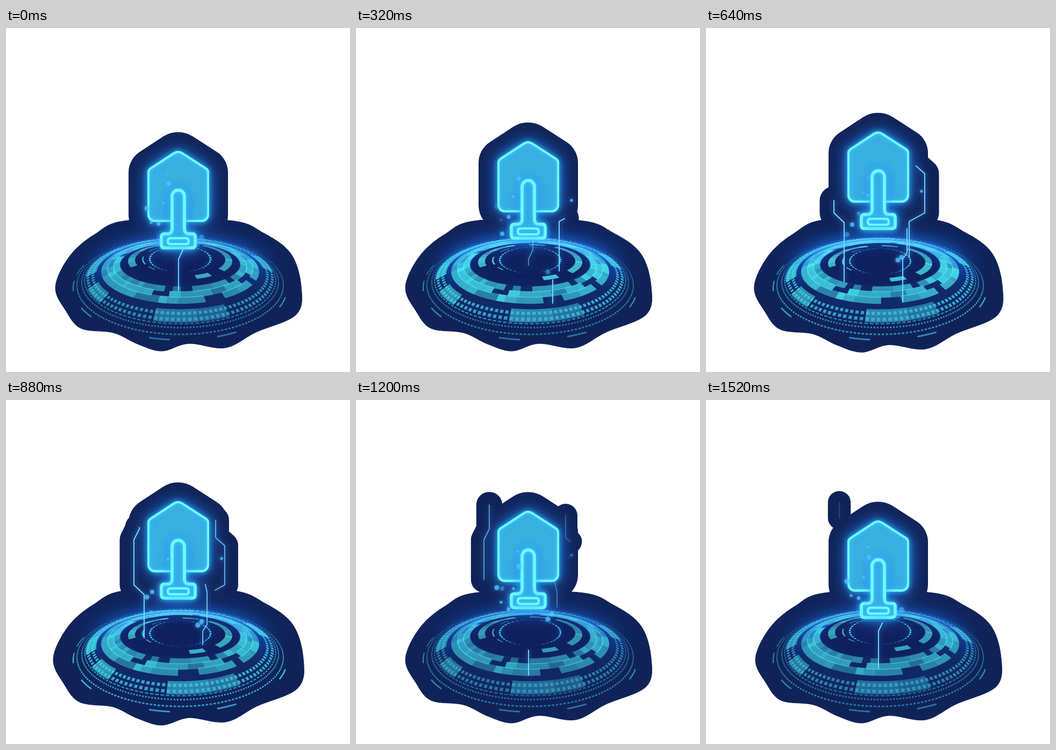
An HTML page with a canvas for the animation above (1.6 s loop, 640 px wide and 640 px high).

```html
<!DOCTYPE html>
<html>
<head>
<meta charset="utf-8">
<style>
  html, body { margin: 0; overflow: hidden; background: #fff; }
  canvas { display: block; }
</style>
</head>
<body>
<canvas id="stage" width="640" height="640"></canvas>
<script>
const ctx = document.getElementById('stage').getContext('2d');
const NAVY = '#102359', LOOP = 1600, STEP = 80, TAU = Math.PI * 2;
const clamp = v => Math.max(0, Math.min(1, v));
const rnd = i => { const v = Math.sin(i * 12.9898) * 43758.5453; return v - Math.floor(v); };
const since = (t, born) => (t - born + LOOP) % LOOP;

// Closed Catmull-Rom curve through a few points
function smoothShape(pts) {
  const path = new Path2D(), n = pts.length, at = i => pts[(i + n) % n];
  path.moveTo(...pts[0]);
  for (let i = 0; i < n; i++) {
    const [a, b, c, d] = [at(i - 1), at(i), at(i + 1), at(i + 2)];
    path.bezierCurveTo(b[0] + (c[0] - a[0]) / 6, b[1] + (c[1] - a[1]) / 6,
      c[0] - (d[0] - b[0]) / 6, c[1] - (d[1] - b[1]) / 6, ...c);
  }
  return path;
}
const floorShape = smoothShape([
  [228, 358], [165, 384], [118, 425], [92, 482], [112, 527], [140, 559], [200, 567], [245, 588],
  [290, 601], [340, 587], [408, 595], [465, 566], [540, 533], [549, 480], [530, 420], [480, 382], [414, 358]]);

// Shovel icon at its lowest position
const blade = new Path2D();
blade.moveTo(309, 359);
[[265, 359, 265, 264, 12], [265, 264, 320, 228, 9], [320, 228, 376, 264, 14],
 [376, 264, 376, 359, 9], [376, 359, 332, 359, 12]].forEach(a => blade.arcTo(...a));
blade.lineTo(331, 359);
const handle = new Path2D(`M309 313 A11.5 11.5 0 0 1 332 313 V373 Q332 383 340 383 H347
  Q352 383 352 389 V403 Q352 409 346 409 H295 Q289 409 289 403 V389 Q289 383 295 383 H301
  Q309 383 309 373 Z`);
const slot = new Path2D('M306 391 H335 Q340 391 340 396.5 Q340 402 335 402 H306 Q301 402 301 396.5 Q301 391 306 391 Z');

// Light traces: outline, length, time of birth
const traces = [
  ['M378 452V360L407 344V271L390 256V215', 262, 160],
  ['M257 472V362L238 344V260L248 240V190', 292, 400],
  ['M366 512V430L374 418V357L369 335', 182, 230],
  ['M321 512V430L329 413V388', 118, 1040]
].map(([d, length, born]) => ({ path: new Path2D(d), length, born }));

// Rising sparks: x, final y, time of birth, radius
const sparks = [
  [303, 277, 880, 4.5], [272, 350, 0, 4], [293, 306, 1057, 2.5], [262, 332, 590, 4.5], [270, 357, 635, 2.7],
  [284, 344, 1060, 3.5], [301, 271, 440, 2.4], [401, 288, 0, 2.7], [357, 402, 270, 4.5], [364, 388, 410, 4.5]];

// Floor rings are ellipses that widen towards the viewer
function project(r, a) {
  const u = Math.max(0, (r - 57) / 135);
  const top = 408 - 20 * u, bottom = 456 + 114 * u ** 1.7;
  return [324 + r * Math.cos(a), (top + bottom) / 2 + (bottom - top) / 2 * Math.sin(a)];
}
function fillBands(bands, alpha, rotation = 0) {
  for (const [r0, r1, a0, a1, strength = 1] of bands) {
    const n = Math.ceil((a1 - a0) / .06), angle = i => a0 + rotation + (a1 - a0) * i / n;
    ctx.globalAlpha = alpha * strength;
    ctx.beginPath();
    for (let i = 0; i <= n; i++) ctx.lineTo(...project(r1, angle(i)));
    for (let i = n; i >= 0; i--) ctx.lineTo(...project(r0, angle(i)));
    ctx.fill();
  }
}
const dashes = (r0, r1, n, duty) =>
  Array.from({ length: n }, (_, i) => [r0, r1, i * TAU / n, (i + duty) * TAU / n]);

// Random ring pieces with varied length, strength and gaps
function pieces(r0, r1, seed, size, gapAt) {
  const out = [];
  for (let a = 0; a < TAU; seed += 3) {
    const end = Math.min(TAU, a + size * (.4 + rnd(seed)));
    if (rnd(seed + 1) > gapAt(a)) out.push([r0, r1, a, end, .5 + .5 * rnd(seed + 2)]);
    a = end;
  }
  return out;
}
const midGap = a => a < 1 ? .5 : a < 2 ? .25 : .08;
const rimGap = a => a < Math.PI ? .5 : .25;

const outerArcs = [.28, 1.117, 1.766, 2.65, 3.18, 3.5].map(a => [198, 200, a - .1, a + .1]);
const dotted = [...dashes(191, 193, 160, .62), ...dashes(182, 184, 190, .5)];
const windows = [...dashes(160, 165, 100, .6), ...dashes(169, 174, 100, .6), ...dashes(177, 178.5, 110, .65)];
const rimPieces = pieces(156, 176, 11, .42, rimGap);
const midPieces = [112, 123, 134].flatMap((r, lane) => pieces(r, r + 13, 40 + lane * 100, .26, midGap));
const hubRing = dashes(55, 58, 38, .66);
const hubPieces = [...pieces(68, 71, 5, .3, () => .7), ...pieces(84, 97, 309, .26, a => a > .7 && a < 2.3 ? .9 : .35)];

function shadow(color, blur) {
  ctx.shadowColor = color;
  ctx.shadowBlur = blur;
}
const noShadow = () => shadow('transparent', 0);

function verticalFade(y0, y1, ...colors) {
  const fade = ctx.createLinearGradient(0, y0, 0, y1);
  colors.forEach((c, i) => fade.addColorStop(i / (colors.length - 1), c));
  return fade;
}

function drawTraces(t, halo) {
  for (const { path, length, born } of traces) {
    const age = since(t, born);
    const head = length * (1 - (1 - clamp(age / 1100)) ** 3.2);
    const tail = length * clamp((age - 400) / 800);
    const alpha = clamp((1250 - age) / 700);
    if (head - tail < 1 || !alpha) continue;
    ctx.setLineDash([head - tail, 999]);
    ctx.lineDashOffset = -tail;
    ctx.lineWidth = halo ? 40 + 13 * alpha : 1.8;
    ctx.globalAlpha = halo ? 1 : alpha;
    ctx.stroke(path);
  }
  ctx.setLineDash([]);
  ctx.globalAlpha = 1;
}

function drawBackdrop(t, lift, pulse) {
  ctx.fillStyle = ctx.strokeStyle = NAVY;
  ctx.lineJoin = ctx.lineCap = 'round';
  ctx.fill(floorShape);
  ctx.lineWidth = 1 + 8 * pulse;
  ctx.stroke(floorShape);
  drawTraces(t, true);
  ctx.save();
  ctx.translate(0, lift);
  ctx.lineWidth = 74;
  ctx.fill(blade);
  ctx.stroke(blade);
  ctx.restore();
  ctx.fillRect(252, 320, 136, 60);
}

function drawDisc(phase, glow, pulse) {
  // Blue light along the far rim
  ctx.fillStyle = verticalFade(385, 490, '#1465d8', 'rgba(16,60,170,.35)', 'rgba(14,45,130,.1)');
  shadow('#1470ff', 40);
  fillBands([[110, 180, Math.PI, TAU]], .55 + .45 * glow);
  shadow('#1470ff', 18);
  fillBands([[110, 176, 0, TAU]], .5 + .3 * glow);
  noShadow();
  ctx.fillStyle = '#0d1e60';
  fillBands([[0, 110, 0, TAU]], .6);

  const cyan = verticalFade(388, 572, '#6ff4ff', '#48eaf0', '#40cfe2', '#36a6d2');
  const spin = -.16 * phase, mid = .72 + .28 * glow, bright = Math.max(glow, pulse);
  ctx.fillStyle = cyan;
  fillBands(outerArcs, .6 + .3 * pulse);
  fillBands(dotted, .6 + .3 * pulse);
  fillBands(rimPieces, .5 + .25 * bright, spin);
  fillBands(windows, .5 + .3 * bright, spin);
  fillBands(midPieces, mid, .4 * phase);

  ctx.save();
  ctx.translate(0, 5 * phase - 2);
  fillBands(hubPieces, .95 * mid, .15 * phase);
  shadow('#1c7dff', 8);
  fillBands(hubRing, .95, .15 * phase);
  ctx.restore();

  ctx.fillStyle = verticalFade(385, 445, 'rgba(110,240,255,.6)', 'rgba(60,200,255,0)');
  shadow('#1e8cff', 24);
  fillBands([[115, 176, Math.PI, TAU]], .35 + .65 * glow);
  noShadow();
  ctx.globalAlpha = 1;
}

function drawIcon(lift) {
  ctx.save();
  ctx.translate(0, lift);
  ctx.strokeStyle = '#6cfaff';
  ctx.fillStyle = '#39b1e0';
  shadow('#1577f0', 34);
  ctx.fill(blade);
  ctx.fill(handle);
  for (const [path, width] of [[blade, 4], [handle, 5.5], [slot, 4]]) {
    ctx.lineWidth = width;
    shadow('#1a90ff', 18);
    ctx.stroke(path);
    shadow('#3fdcff', 8);
    ctx.stroke(path);
  }
  ctx.restore();
}

function drawSparks(t) {
  ctx.fillStyle = '#4fc8ff';
  shadow('#36a8ff', 7);
  for (const [x, y, born, r] of sparks) {
    const age = since(t, born), rest = 1 - clamp(age / 1360);
    ctx.globalAlpha = .75 * clamp(age / 100) * clamp((1450 - age) / 500);
    ctx.beginPath();
    ctx.arc(x, y + 56 * rest * rest, r, 0, TAU);
    ctx.fill();
  }
  ctx.globalAlpha = 1;
  noShadow();
}

function draw(now) {
  const t = Math.floor(now % LOOP / STEP) * STEP;
  const phase = 1 - Math.abs(t / 800 - 1);
  const lift = -45 * phase;
  const glow = .5 + .5 * Math.cos((t - 480) / LOOP * TAU);
  const pulse = clamp(1.6 * (1 - Math.abs(t - 860) / 340));

  ctx.clearRect(0, 0, 640, 640);
  drawBackdrop(t, lift, pulse);
  // Everything else stays inside the navy silhouette
  ctx.globalCompositeOperation = 'source-atop';
  drawDisc(phase, glow, pulse);
  drawIcon(lift);
  ctx.strokeStyle = '#7fe4ff';
  shadow('#2a90ff', 9);
  drawTraces(t, false);
  drawSparks(t);
  ctx.globalCompositeOperation = 'source-over';
  requestAnimationFrame(draw);
}
requestAnimationFrame(draw);
</script>
</body>
</html>
```
